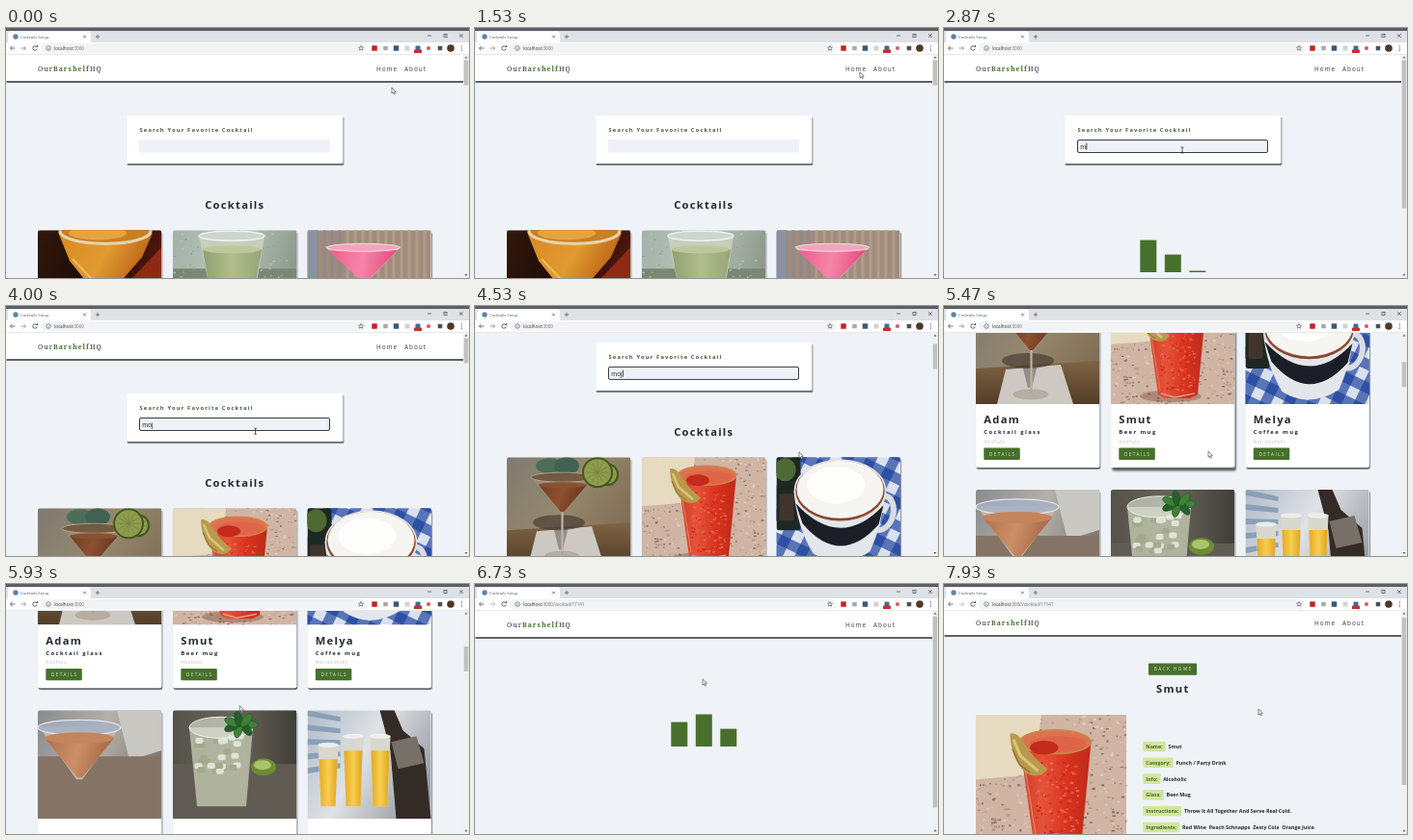
An HTML page with a canvas for the animation above (8 s loop, 480 by 260 pixels).

```html
<!DOCTYPE html>
<html lang="en">
<head>
<meta charset="utf-8">
<title>Cocktails Setup</title>
<style>
html, body { margin: 0; width: 100%; height: 100%; overflow: hidden; background: #eff3f8; }
canvas { display: block; width: 480px; height: 260px; }
</style>
</head>
<body>
<canvas id="stage"></canvas>
<script>
const W = 480, H = 260, LOOP = 8000, TOP = 28, RIGHT = 474;
const PAGE = '#eff3f8', GREEN = '#47702c', INK = '#24282e';
const SANS = '"Open Sans", sans-serif', SERIF = '"Noto Serif", serif', ARIAL = '"Liberation Sans", sans-serif';
const canvas = document.getElementById('stage');
const ctx = canvas.getContext('2d');
const dpr = window.devicePixelRatio || 1;
canvas.width = W * dpr;
canvas.height = H * dpr;

// Key times in ms
const FOCUS = 1970, SEARCH = 2870, RESULTS = 3600, OPEN = 6530, LOADED = 7150;
const TYPED = [[SEARCH, 'm'], [3170, 'mo'], [3400, 'moj']];
const CURSOR = [[600, 400, 62], [1000, 396, 44], [1400, 406, 42], [1470, 406, 42], [1950, 247, 127],
  [3870, 247, 127], [4450, 336, 152], [4730, 336, 152], [5060, 274, 152.5], [5600, 274, 151],
  [6300, 205, 98], [6530, 205, 98], [6710, 236, 99], [7400, 236, 99], [7870, 326, 130]];
const LIST_SCROLL = [[4250, 0], [4530, 53], [4670, 70], [4730, 70], [5000, 105], [5130, 108],
  [5250, 121], [5470, 221], [5530, 246], [5600, 246], [5900, 281]];
const DETAIL_SCROLL = [[7860, 0], [7930, 2]];

const smooth = p => p * p * (3 - 2 * p);

function track(keys, t, ease = p => p) {
  if (t <= keys[0][0]) return keys[0].slice(1);
  for (let i = 1; i < keys.length; i++) {
    const a = keys[i - 1], b = keys[i];
    if (t < b[0]) {
      const p = ease((t - a[0]) / (b[0] - a[0]));
      return a.slice(1).map((v, k) => v + (b[k + 1] - v) * p);
    }
  }
  return keys[keys.length - 1].slice(1);
}

function random(seed) {
  return () => (seed = (seed * 16807) % 2147483647) / 2147483647;
}

// Drawing helpers
function box(x, y, w, h, fill, r = 0) {
  ctx.fillStyle = fill;
  ctx.beginPath();
  ctx.roundRect(x, y, w, h, r);
  ctx.fill();
}

function shadowBox(x, y, w, h, fill, r = 0, deep = false) {
  const k = deep ? 2 : 1;
  ctx.save();
  ctx.shadowColor = 'rgba(0,0,0,.6)';
  ctx.shadowOffsetX = 0.7 * k * dpr;
  ctx.shadowOffsetY = 1.75 * k * dpr;
  ctx.shadowBlur = k * dpr;
  box(x, y, w, h, fill, r);
  ctx.restore();
}

function poly(points, fill) {
  ctx.fillStyle = fill;
  ctx.beginPath();
  points.forEach(p => ctx.lineTo(p[0], p[1]));
  ctx.closePath();
  ctx.fill();
}

function line(points, color, width = 1) {
  ctx.strokeStyle = color;
  ctx.lineWidth = width;
  ctx.beginPath();
  points.forEach(p => ctx.lineTo(p[0], p[1]));
  ctx.stroke();
}

function oval(x, y, rx, ry, fill, stroke, width = 1, turn = 0) {
  ctx.beginPath();
  ctx.ellipse(x, y, rx, ry, turn, 0, Math.PI * 2);
  if (fill) { ctx.fillStyle = fill; ctx.fill(); }
  if (stroke) { ctx.strokeStyle = stroke; ctx.lineWidth = width; ctx.stroke(); }
}

function blend(x0, y0, x1, y1, ...colors) {
  const g = ctx.createLinearGradient(x0, y0, x1, y1);
  colors.forEach((c, i) => g.addColorStop(i / (colors.length - 1), c));
  return g;
}

// Returns the advance width
function text(str, x, y, size, color, { weight = 400, gap = 0, font = SANS, center = false } = {}) {
  ctx.font = `${weight} ${size}px ${font}`;
  ctx.letterSpacing = gap + 'px';
  ctx.fillStyle = color;
  const w = ctx.measureText(str).width;
  ctx.fillText(str, center ? x - w / 2 : x, y);
  return w;
}

function speckle(seed, count, x, y, w, h, colors) {
  const rnd = random(seed);
  for (let i = 0; i < count; i++) {
    ctx.fillStyle = colors[Math.floor(rnd() * colors.length)];
    ctx.fillRect(x + rnd() * w, y + rnd() * h, 1 + rnd() * 2, 1 + rnd());
  }
}

// Drink pictures, each 128 wide and 113 high
function sugarRim() {
  box(0, 0, 128, 113, blend(0, 0, 128, 50, '#32170c', '#1c0c07', '#5a180e'));
  poly([[128, 18], [92, 56], [128, 56]], '#8e2a14');
  poly([[21, 2], [119, 3], [108, 28], [82, 58], [54, 58], [33, 32]], blend(25, 0, 115, 50, '#d98a22', '#e09a30', '#b4560f'));
  oval(70, 1, 47, 13, '#c98023', '#e4d3b0', 3);
  oval(62, 3, 30, 7, '#e6a440');
  line([[36, 30], [57, 52]], '#f0bd62', 2);
}

function greenTumbler() {
  box(0, 0, 128, 113, blend(0, 0, 128, 30, '#a2b2aa', '#bac4b9', '#8c9a8c'));
  box(0, 40, 128, 73, '#788873');
  speckle(5, 90, 0, 0, 128, 50, ['#b7c2b4', '#94a294', '#a9b5a8']);
  poly([[27, 6], [95, 6], [86, 60], [38, 60]], '#c6cfbd');
  poly([[31, 20], [92, 20], [85, 60], [38, 60]], blend(30, 0, 92, 0, '#8f9f70', '#b2bd8c', '#96a578'));
  oval(61, 6, 34, 5, '#ccd6cc', '#edf2ea', 1.5);
  oval(61, 20, 30, 4, '#bdc79b');
}

function pinkMartini() {
  box(0, 0, 128, 113, '#a08b7c');
  for (let x = 0; x < 128; x += 8) box(x, 0, 3, 113, x < 35 ? '#8d8a8b' : '#b19b89');
  box(0, 0, 10, 113, '#8992a0');
  poly([[18, 17], [97, 17], [60, 56]], '#cfb8b4');
  poly([[22, 21], [93, 21], [61, 54], [57, 54]], blend(22, 20, 93, 30, '#ee5b8b', '#f585aa', '#e4487c'));
  oval(58, 18, 38, 4, '#f4a3bd', '#f3dfe1');
}

function amberMartini() {
  box(0, 0, 128, 113, blend(0, 0, 128, 80, '#807a70', '#94886f', '#7f6a50'));
  poly([[0, 76], [128, 68], [128, 113], [0, 113]], blend(0, 70, 0, 113, '#7d6243', '#523d28'));
  poly([[31, 77], [88, 72], [101, 113], [22, 113]], '#cdc9c2');
  oval(54, 68, 27, 8, 'rgba(60,50,42,.6)');
  poly([[48, 72], [64, 72], [58, 96], [54, 96]], 'rgba(80,70,62,.45)');
  oval(44, 9, 14, 8, '#4d6d58');
  oval(62, 9, 13, 9, '#426152');
  poly([[25, 21], [91, 21], [60, 58], [55, 58]], 'rgba(160,140,112,.7)');
  poly([[33, 29], [83, 29], [59, 57], [56, 57]], blend(30, 25, 85, 45, '#693a22', '#8e5030', '#5d301c'));
  oval(58, 21, 33, 5, 'rgba(105,80,55,.8)', '#b9ac97', 0.8);
  oval(58, 29, 25, 3, '#875132');
  line([[57.5, 57], [57.5, 101]], '#bfb5a6', 2.2);
  oval(57, 103, 18, 5, 'rgba(150,140,125,.45)', '#b3a999', 0.8);
  lime(104, 18, 12);
  lime(94, 16, 16);
}

function lime(x, y, r) {
  oval(x, y, r, r, '#41591f');
  oval(x, y, r - 2, r - 2, '#8f9c50');
  for (let a = 0; a < 6; a++) {
    const c = Math.cos(a * Math.PI / 6), s = Math.sin(a * Math.PI / 6);
    line([[x - c * r * 0.75, y - s * r * 0.75], [x + c * r * 0.75, y + s * r * 0.75]], '#75863b', 0.8);
  }
}

function redTumbler() {
  box(0, -8, 128, 150, '#d0b5a5');
  speckle(11, 650, 0, -8, 128, 150, ['#b2907f', '#e2cdbf', '#c09a89', '#8a7168', '#dcbfae']);
  poly([[0, -8], [56, -8], [50, 47], [0, 51]], '#e6dac0');
  oval(62, 105, 32, 6, 'rgba(120,72,58,.4)');
  poly([[37, 18], [98, 18], [90, 103], [82, 107], [56, 107], [49, 103]], blend(36, 0, 98, 0, '#cb3a22', '#e5523a', '#d8331f', '#bd2a18'));
  speckle(29, 130, 50, 34, 37, 66, ['#ec6a4d', '#cf2a1a', '#e25a42']);
  oval(67.5, 19, 30, 10, '#dd7150', '#d08546', 1.6);
  oval(70, 21, 24, 7, '#df6549');
  oval(58, 24, 12, 6, '#c42a1c');
  line([[40, 30], [51, 99]], '#ea8a70', 0.9);
  line([[52, 102], [66, 106], [87, 102]], '#dfa08a', 1.5);
  ctx.fillStyle = '#b99a4c';
  ctx.beginPath();
  ctx.moveTo(29, 12);
  ctx.quadraticCurveTo(36, 10, 42, 22);
  ctx.quadraticCurveTo(50, 34, 61, 42);
  ctx.quadraticCurveTo(54, 52, 42, 45);
  ctx.quadraticCurveTo(30, 34, 29, 12);
  ctx.fill();
  line([[32, 17], [38, 31], [53, 44]], '#dcc37c', 2.5);
  line([[31, 25], [37, 38], [46, 45]], '#85702f', 1);
}

function coffeeMug() {
  box(0, 0, 128, 113, '#d9e0ee');
  ctx.save();
  ctx.translate(64, 60);
  ctx.rotate(0.45);
  for (let i = -5; i < 6; i++) {
    box(i * 22, -110, 11, 220, 'rgba(24,62,155,.66)');
    box(-110, i * 22, 220, 11, 'rgba(24,62,155,.66)');
  }
  ctx.restore();
  box(0, 0, 25, 76, '#1e2822', 3);
  oval(9, 13, 11, 12, '#4d6a35');
  box(3, 38, 15, 28, '#40352c', 2);
  oval(109, 58, 12, 18, null, '#d9dde2', 6, 0.25);
  ctx.fillStyle = '#e3e6ea';
  ctx.beginPath();
  ctx.moveTo(18, 35);
  ctx.lineTo(113, 35);
  ctx.quadraticCurveTo(110, 70, 97, 98);
  ctx.quadraticCurveTo(66, 118, 38, 100);
  ctx.quadraticCurveTo(21, 72, 18, 35);
  ctx.fill();
  ctx.fillStyle = '#1b1e26';
  ctx.beginPath();
  ctx.moveTo(20, 48);
  ctx.quadraticCurveTo(66, 98, 111, 50);
  ctx.lineTo(106, 70);
  ctx.quadraticCurveTo(66, 115, 27, 69);
  ctx.fill();
  oval(66, 35, 47, 32, '#8c4730', '#e5e5e2', 1.5);
  oval(66, 33.5, 45, 30, '#f6f5f2');
  oval(62, 29, 30, 19, '#fdfdfb');
}

function peachMartini() {
  box(0, 0, 128, 113, blend(0, 0, 128, 60, '#888b8d', '#b5b1aa', '#77736f'));
  poly([[82, 0], [128, 0], [128, 42], [95, 52]], '#c9c8c3');
  box(0, 48, 128, 65, '#857466');
  poly([[1, 17], [86, 17], [46, 72], [40, 72]], '#c6b6a8');
  poly([[7, 29], [79, 29], [46, 70], [41, 70]], blend(5, 25, 80, 50, '#ad6b47', '#cc9068', '#9d5f3c'));
  oval(43, 18, 43, 8, 'rgba(163,178,200,.75)', '#e2e5e9', 1.2);
  oval(43, 29, 36, 6, '#c4855c');
}

function mintGlass() {
  box(0, 0, 128, 113, blend(0, 0, 128, 0, '#55524a', '#69655b', '#403e38'));
  box(0, 56, 128, 57, '#605c53');
  oval(94, 59, 13, 9, '#6c8c36');
  oval(93, 57, 9, 5, '#a9c46a');
  poly([[17, 18], [83, 18], [76, 100], [25, 100]], 'rgba(190,194,172,.85)');
  const rnd = random(17);
  for (let i = 0; i < 26; i++) {
    box(22 + rnd() * 48, 24 + rnd() * 38, 8, 6, i % 2 ? '#dfe2d4' : '#a3aa8c', 2);
  }
  oval(50, 18, 33, 11, 'rgba(222,226,213,.65)', '#eef0ea');
  for (let i = 0; i < 7; i++) {
    const a = i * 0.9;
    oval(70 + 10 * Math.cos(a), 15 + 6 * Math.sin(a), 8, 4, i % 2 ? '#265f29' : '#3f8136', '#1b4720', 0.5, a);
  }
}

function brunchGlasses() {
  box(0, 0, 128, 113, blend(0, 0, 128, 70, '#b0bbc8', '#dfe2e6', '#989ea5'));
  for (let i = 0; i < 5; i++) poly([[0, i * 15], [34, i * 12 + 7], [34, i * 12 + 12], [0, i * 15 + 6]], '#8b9fb8');
  poly([[75, 0], [90, 0], [99, 21], [121, 40], [128, 113], [92, 113], [86, 42]], '#342b27');
  poly([[87, 33], [113, 27], [121, 55], [94, 61]], '#767069');
  [[11, 36], [37, 27], [65, 27]].forEach(([x, y]) => {
    poly([[x, y], [x + 21, y], [x + 18, 100], [x + 3, 100]], '#d8d8cf');
    poly([[x + 1, y + 15], [x + 20, y + 15], [x + 18, 100], [x + 3, 100]], blend(x, 0, x + 21, 0, '#e3a51d', '#f8ce50', '#dda01d'));
    oval(x + 10.5, y, 10.5, 2, '#e9ece9', '#fff', 0.6);
  });
}

// Browser frame
function chrome(t) {
  box(0, 0, W, 3, '#5d5f64');
  box(0, 3, W, 12, '#dee1e6');
  box(2, 3.5, 86, 12, '#fff', [3, 3, 0, 0]);
  oval(10, 9, 2.7, 2.7, '#5b83ad');
  text('Cocktails Setup', 15, 10.6, 4.2, '#555a60');
  cross(81.5, 9, 1.4, '#555');
  line([[92.8, 9], [97.2, 9]], '#555', 0.7);
  line([[95, 6.8], [95, 11.2]], '#555', 0.7);
  line([[437, 8], [441, 8]], '#444', 0.7);
  ctx.strokeRect(454, 6.5, 3, 3);
  cross(472, 8, 1.8, '#444');

  box(0, 15, W, 13, '#fff');
  box(36, 16, 338, 10, '#f1f3f4', 5);
  arrow(7, 21, -1, '#555');
  arrow(18, 21, 1, t >= OPEN ? '#b4b7ba' : '#8a8d91');
  ctx.strokeStyle = '#555';
  ctx.lineWidth = 0.9;
  ctx.beginPath();
  ctx.arc(30, 21, 2.2, 0.2, 5.4);
  ctx.stroke();
  poly([[30.6, 20], [33, 20], [33, 17.6]], '#555');
  oval(44, 21, 2.3, 2.3, null, '#666', 0.7);
  line([[44, 20.7], [44, 22.3]], '#666', 0.7);
  const w = text('localhost', 50, 22.7, 4.6, '#33373b');
  text(':3000' + (t >= OPEN ? '/cocktail/17141' : ''), 50 + w, 22.7, 4.6, '#6a6e73');
  const star = [];
  for (let i = 0; i < 11; i++) {
    const r = i % 2 ? 1.2 : 2.6, a = i * Math.PI / 5 - Math.PI / 2;
    star.push([368 + r * Math.cos(a), 21 + r * Math.sin(a)]);
  }
  line(star, '#5f6368', 0.7);
  [[382, '#c8201e', 5.5], [393.5, '#a6a9ad', 4.5], [404.5, '#3c5878', 5.5], [416, '#d0d3d6', 5],
    [427, '#3f6b9b', 5], [438, '#d3505c', 3.5], [450, '#4d5156', 4.5]].forEach(([x, c, s]) =>
    box(x - s / 2, 21 - s / 2, s, s, c, 0.5));
  box(423, 22.5, 8, 3.5, '#c4302e', 0.5);
  oval(461, 21, 3.8, 3.8, '#4c3826');
  [18.8, 21, 23.2].forEach(y => oval(472.5, y, 0.6, 0.6, '#555'));
  box(0, 27.3, W, 0.7, '#e0e2e5');
}

function cross(x, y, r, color) {
  line([[x - r, y - r], [x + r, y + r]], color, 0.7);
  line([[x + r, y - r], [x - r, y + r]], color, 0.7);
}

function arrow(x, y, dir, color) {
  line([[x - 2.5 * dir, y], [x + 2.5 * dir, y]], color, 0.8);
  line([[x + 0.3 * dir, y - 2.3], [x + 2.5 * dir, y], [x + 0.3 * dir, y + 2.3]], color, 0.8);
}

function scrollbar(scroll, size) {
  box(RIGHT, TOP, 6, H - TOP, '#f1f1f1');
  box(474.7, 33.5 + scroll * size / 232, 4.6, size, '#c1c1c1');
  poly([[475.5, 31.5], [478.5, 31.5], [477, 29.5]], '#606060');
  poly([[475.5, 256], [478.5, 256], [477, 258]], '#606060');
}

// Page parts
function header() {
  shadowBox(-2, TOP - 4, RIGHT + 2, 31, '#fff');
  let x = 33;
  x += text('Our', x, 44.5, 7, '#2c3034', { gap: 1, font: SERIF });
  x += text('Barshelf', x, 44.5, 7, GREEN, { gap: 1, font: SERIF, weight: 700 });
  text('HQ', x, 44.5, 7, '#2c3034', { gap: 1, font: SERIF });
  text('Home', 384, 44.7, 6.4, '#3a3e43', { gap: 1 });
  text('About', 413, 44.7, 6.4, '#3a3e43', { gap: 1 });
}

function heading(str, y) {
  text(str, 237.3, y, 11.2, INK, { weight: 700, gap: 1.27, center: true });
}

function searchForm(t) {
  shadowBox(125, 91, 224.5, 50, '#fff', 1);
  text('Search Your Favorite Cocktail', 138.5, 107.9, 5.8, '#465a35', { weight: 700, gap: 1.15 });
  box(138, 116, 198, 13.5, '#eef2f8', 1);
  if (t < FOCUS) return;
  ctx.strokeStyle = '#22262a';
  ctx.lineWidth = 0.9;
  ctx.beginPath();
  ctx.roundRect(138.5, 116.5, 197, 13, 1.5);
  ctx.stroke();
  let value = '', since = FOCUS;
  TYPED.forEach(([at, word]) => { if (t >= at) { value = word; since = at; } });
  const w = text(value, 141.3, 125.8, 7, '#2c2f33', { font: ARIAL });
  if ((t - since) % 1000 < 500) box(141.6 + w, 119.8, 0.8, 7, '#111');
}

function loader(age, base) {
  const curve = p => {
    if (p >= 0.8) return 0;
    const u = p < 0.4 ? p / 0.4 : (0.8 - p) / 0.4;
    return smooth(u);
  };
  [0.32, 0.16, 0].forEach((lead, i) => {
    const h = 34 * curve((age / 1000 + lead) % 1);
    box(203.3 + i * 25.5, base - h, 17, h, GREEN);
  });
}

function button(label, x, y, w) {
  box(x, y, w, 12.3, GREEN, 1);
  text(label, x + w / 2 + 0.7, y + 8, 4.6, '#e3ebda', { gap: 1.5, center: true });
}

function card(col, row, picture, info, mouse) {
  const x = [33, 173, 312.5][col], y = 210.3 + row * 202;
  const over = mouse && mouse[0] > x && mouse[0] < x + 128.5 && mouse[1] > y && mouse[1] < y + 179;
  shadowBox(x, y, 128.5, 179, '#fff', 2, over);
  ctx.save();
  ctx.beginPath();
  ctx.roundRect(x, y, 128.5, 113, [2, 2, 0, 0]);
  ctx.clip();
  ctx.translate(x, y);
  picture();
  ctx.restore();
  if (!info) return;
  const [name, glass, kind] = info;
  text(name, x + 8.3, y + 133.4, 11.2, INK, { weight: 700, gap: 1.27 });
  text(glass, x + 8.3, y + 144.4, 5.9, INK, { weight: 700, gap: 1.4 });
  text(kind, x + 8.3, y + 153.8, 4.9, '#bfc4c9', { gap: 0.2 });
  button('DETAILS', x + 8.3, y + 158.7, 37.5);
}

const BEFORE = [[sugarRim], [greenTumbler], [pinkMartini]];
const FOUND = [
  [amberMartini, ['Adam', 'Cocktail glass', 'Alcoholic']],
  [redTumbler, ['Smut', 'Beer mug', 'Alcoholic']],
  [coffeeMug, ['Melya', 'Coffee mug', 'Non alcoholic']],
  [peachMartini], [mintGlass], [brunchGlasses]
];

function listPage(t, mouse) {
  header();
  searchForm(t);
  if (t >= SEARCH && t < RESULTS) {
    loader(t - SEARCH + 50, 254);
    return;
  }
  heading('Cocktails', 187.8);
  (t < SEARCH ? BEFORE : FOUND).forEach(([picture, info], i) =>
    card(i % 3, Math.floor(i / 3), picture, info, mouse));
}

const FACTS = [
  ['Name:', 'Smut'], ['Category:', 'Punch / Party Drink'], ['Info:', 'Alcoholic'], ['Glass:', 'Beer Mug'],
  ['Instructions:', 'Throw It All Together And Serve Real Cold.'],
  ['Ingredients:', 'Red Wine  Peach Schnapps  Zesty Cola  Orange Juice']
];

function detailPage(t) {
  header();
  if (t < LOADED) {
    loader(t - OPEN + 10, 169);
    return;
  }
  button('BACK HOME', 212, 84.4, 50);
  heading('Smut', 115.2);
  ctx.save();
  ctx.beginPath();
  ctx.rect(33, 138, 156.5, 156);
  ctx.clip();
  ctx.translate(33, 143);
  ctx.scale(1.22, 1.22);
  redTumbler();
  ctx.restore();
  FACTS.forEach(([label, value], i) => {
    const y = 171 + i * 16.8, size = 5.35;
    ctx.font = `700 ${size}px ${SANS}`;
    ctx.letterSpacing = '0px';
    const w = ctx.measureText(label).width + 6;
    box(206.3, y - 5.3, w, 10.6, '#d2e69c', 1);
    text(label, 209.3, y + 1.9, size, '#46692c', { weight: 700 });
    text(value, 206.3 + w + 2.7, y + 1.9, size, INK, { weight: 700 });
  });
}

function pointer(t, x, y) {
  if (t > 1900 && t < 4020) {
    line([[x, y - 3], [x, y + 3]], '#333', 0.8);
    line([[x - 1.5, y - 3], [x + 1.5, y - 3]], '#333', 0.7);
    line([[x - 1.5, y + 3], [x + 1.5, y + 3]], '#333', 0.7);
    return;
  }
  const shape = [[0, 0], [0, 6], [1.4, 4.9], [2.4, 7], [3.4, 6.5], [2.5, 4.5], [4.3, 4.4]];
  poly(shape.map(p => [x + p[0], y + p[1]]), '#fff');
  ctx.strokeStyle = '#333';
  ctx.lineWidth = 0.6;
  ctx.stroke();
}

function draw(t) {
  ctx.setTransform(dpr, 0, 0, dpr, 0, 0);
  box(0, 0, W, H, PAGE);
  const detail = t >= OPEN;
  const [scroll] = track(detail ? DETAIL_SCROLL : LIST_SCROLL, t);
  const [x, y] = track(CURSOR, t, smooth);
  ctx.save();
  ctx.beginPath();
  ctx.rect(0, TOP, RIGHT, H - TOP);
  ctx.clip();
  ctx.translate(0, -scroll);
  if (detail) detailPage(t);
  else listPage(t, [x, y + scroll]);
  ctx.restore();
  let thumb = 26;
  if (detail) thumb = t < LOADED ? 199 : 174;
  else if (t >= SEARCH && t < RESULTS) thumb = 154;
  scrollbar(scroll, thumb);
  chrome(t);
  pointer(t, x, y);
}

const start = performance.now();
function tick() {
  draw((performance.now() - start) % LOOP);
  requestAnimationFrame(tick);
}
tick();
</script>
</body>
</html>
```
